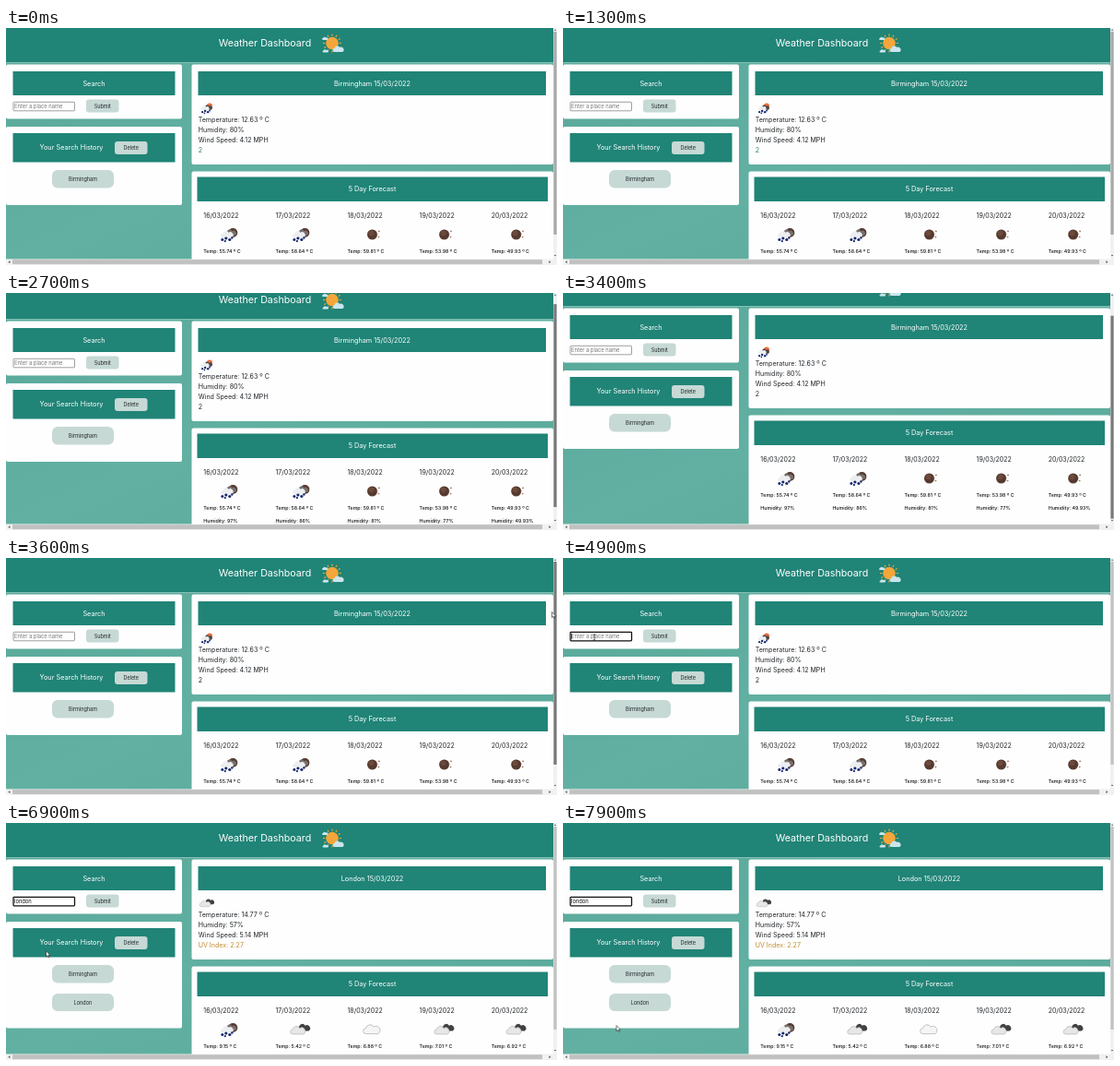
These frames come from a looping animation (598x257 px, 8 s). An HTML page:

```html
<!DOCTYPE html>
<html lang="en">
<head>
<meta charset="utf-8">
<title>Weather Dashboard</title>
<style>
html, body { margin: 0; width: 598px; height: 257px; overflow: hidden; }
svg { display: block; font-family: Inter, "Open Sans", sans-serif; font-size: 7.3px; fill: #212529; }
.mid { text-anchor: middle; }
.light { fill: #fff; }
.title { font-size: 10.7px; }
.line { font-size: 7.1px; }
.date { font-size: 7px; }
.small { font-size: 5.3px; font-weight: 500; fill: #111; }
.button { font-size: 5.5px; }
.field { font-size: 5.8px; }
</style>
</head>
<body>
<svg id="stage" width="598" height="257" viewBox="0 0 598 257">
  <defs>
    <linearGradient id="backdrop" x2="1" y2="1">
      <stop offset="0" stop-color="#58a899"/>
      <stop offset=".5" stop-color="#62b0a2"/>
      <stop offset="1" stop-color="#58a899"/>
    </linearGradient>
    <path id="puff" d="M-6 4a2.6 2.6 0 0 1 0-5.2a4 4 0 0 1 7.4-1.4a3.3 3.3 0 0 1 4.2 6.6z"/>
    <g id="drops" fill="#17296f">
      <circle cx="-6.5" cy="5.5" r="1.5"/><circle cx="-2.5" cy="4" r="1.6"/>
      <circle cx="1.5" cy="5.5" r="1.6"/><circle cx="-3.5" cy="7.2" r="1.1"/>
      <circle cx="4" cy="3.5" r="1.2"/>
    </g>
    <g id="rainDay">
      <circle cx="4" cy="-3.5" r="4" fill="#ea6e3c"/>
      <use href="#puff" transform="translate(2 -1) scale(.8)" fill="#4a4547"/>
      <use href="#puff" transform="translate(-2 0) scale(.75)" fill="#eceef0"/>
      <use href="#drops"/>
    </g>
    <g id="rainNight">
      <circle cx="5" cy="-2" r="5" fill="#56392f"/>
      <use href="#puff" transform="translate(3 -2) scale(.75)" fill="#77706e"/>
      <use href="#puff" transform="translate(-1 0) scale(.85)" fill="#eceef0"/>
      <use href="#drops"/>
    </g>
    <g id="clearNight">
      <circle r="5.5" fill="#56392f"/>
      <circle cx="-1" cy="-1.5" r="3" fill="#6c4a3b"/>
      <circle cx="7.4" cy="-3.6" r=".9" fill="#a07a66"/>
      <circle cx="7" cy="2.6" r=".9" fill="#a07a66"/>
      <circle cx="5.4" cy="-.6" r=".6" fill="#a07a66"/>
    </g>
    <g id="clouds">
      <use href="#puff" transform="translate(4 -2) scale(.9)" fill="#414042"/>
      <use href="#puff" transform="translate(-2 1)" fill="#e7e7e7" stroke="#aaa" stroke-width=".6"/>
    </g>
    <use id="cloud" href="#puff" transform="scale(1.15)" fill="#f5f5f5" stroke="#aaa" stroke-width=".6"/>
  </defs>
  <rect width="598" height="257" fill="url(#backdrop)"/>
  <g id="page"></g>
  <g id="bars"></g>
  <path id="arrow" d="M0 0v6.2l1.5-1.3l1 2.2l.9-.4l-1-2.1h2z" fill="#fff" stroke="#222" stroke-width=".6"/>
  <path id="beam" d="M-1.3-3h2.6M0-3v6M-1.3 3h2.6" stroke="#222" stroke-width=".7"/>
</svg>
<script>
const LOOP = 8000, TEAL = '#208477';
const $ = id => document.getElementById(id);

const rect = (x, y, w, h, fill, r = 0, more = '') =>
  `<rect x="${x}" y="${y}" width="${w}" height="${h}" rx="${r}" fill="${fill}" ${more}/>`;
const text = (x, y, str, cls, more = '') => `<text x="${x}" y="${y}" class="${cls}" ${more}>${str}</text>`;
const icon = (name, x, y, size = 1) => `<use href="#${name}" transform="translate(${x} ${y}) scale(${size})"/>`;
const card = (x, y, w, h, more) => rect(x, y, w, h, '#fefefe', 2, more);
const button = (x, y, w, h, r, label) =>
  rect(x, y, w, h, '#c6d9d5', r) + text(x + w / 2, y + h / 2 + 2, label, 'mid button');

function sun() {
  let rays = '';
  for (let a = 0; a < 360; a += 30)
    rays += `<path d="M0-7.8V-10" stroke="#f5a73b" stroke-width="1.1" transform="rotate(${a})"/>`;
  return `<g transform="translate(354 16.5)">${rays}<circle r="6.8" fill="#f5a63a"/>
    <g fill="#c9e6ee"><use href="#puff" transform="translate(7 6.5) scale(.75)"/>
    <use href="#puff" transform="translate(-7.5 -5) scale(.4)"/>
    <use href="#puff" transform="translate(-7 8.5) scale(.4)"/></g></g>`;
}

function report(id, { city, sky, facts, uv, uvColor, days }) {
  const lines = ['Temperature: ' + facts[0] + ' º C', 'Humidity: ' + facts[1] + '%', 'Wind Speed: ' + facts[2] + ' MPH'];
  return `<g id="${id}">` +
    text(397.5, 62.5, city + ' 15/03/2022', 'mid light') +
    icon(sky, 218, 87, .75) +
    lines.map((s, i) => text(208.7, 102 + i * 11.1, s, 'line')).join('') +
    text(208.7, 135.3, uv, 'line', `id="${id}Uv" fill="${uvColor}"`) +
    days.map(([name, temp, damp], i) => {
      const x = 214.3 + i * 78.1;
      return text(x, 205.5, 16 + i + '/03/2022', 'date') + icon(name, x + 27, 224) +
        text(x, 244, `Temp: ${temp} º C`, 'small') + text(x, 258, `Humidity: ${damp}%`, 'small');
    }).join('') + '</g>';
}

const birmingham = {
  city: 'Birmingham', sky: 'rainDay', facts: ['12.63', 80, '4.12'], uv: '2', uvColor: '#212529',
  days: [['rainNight', '55.74', 97], ['rainNight', '58.64', 86], ['clearNight', '59.81', 81],
    ['clearNight', '53.98', 77], ['clearNight', '49.93', 49.93]]
};
const london = {
  city: 'London', sky: 'clouds', facts: ['14.77', 57, '5.14'], uv: 'UV Index: 2.27', uvColor: '#c08c2e',
  days: [['rainNight', '9.15', 80], ['clouds', '5.42', 71], ['cloud', '6.88', 66],
    ['clouds', '7.01', 70], ['clouds', '6.92', 68]]
};

$('page').innerHTML =
  rect(0, 0, 594, 37, TEAL) + rect(0, 37, 594, 1, '#86c0b5') +
  text(281, 19.7, 'Weather Dashboard', 'mid light title') + sun() +
  card(0, 39.5, 191, 59) + rect(7.5, 47, 176, 26, TEAL) + text(95.5, 62.5, 'Search', 'mid light') +
  rect(8, 80.3, 66.5, 9.5, '#fff', .8, 'id="box"') + text(9, 87.2, '', 'field', 'id="typed"') +
  rect(27.6, 81.8, .6, 6.5, '#000', 0, 'id="caret"') +
  button(87, 77.5, 35.5, 14, 3, 'Submit') +
  card(0, 107, 191, 85, 'id="history"') + rect(7.5, 114, 176, 31.5, TEAL) +
  text(71, 132, 'Your Search History', 'mid light') + button(118, 123, 35.5, 14, 3, 'Delete') +
  button(50, 154, 67, 19.5, 6, 'Birmingham') +
  `<g id="saved">${button(50, 185, 67, 19, 6, 'London')}</g>` +
  card(201.5, 39.5, 392.5, 108.5) + rect(208.5, 47, 377.5, 26, TEAL) +
  card(201.5, 155.5, 392.5, 130) + rect(207.5, 161.5, 380.5, 26.5, TEAL) +
  text(397.5, 177, '5 Day Forecast', 'mid light') +
  report('before', birmingham) + report('after', london);

$('bars').innerHTML =
  rect(594, 0, 4, 257, '#f1f1f1') + rect(0, 250.5, 598, 6.5, '#f1f1f1') +
  rect(594.4, 4, 3.2, 220, '#c1c1c1', 0, 'id="thumb"') + rect(7, 251.2, 575, 5, '#c1c1c1') +
  '<path d="M594.8 2.8l1.2-1.6l1.2 1.6zM594.8 246l1.2 1.6l1.2-1.6zM4.4 252.2v3l-2-1.5zM589.4 252.2v3l2-1.5z" fill="#555"/>';

// Interpolates [time, value...] keys with a soft start and stop.
function track(keys, t) {
  if (t <= keys[0][0]) return keys[0].slice(1);
  for (let i = 1; i < keys.length; i++) {
    const [a, b] = [keys[i - 1], keys[i]];
    if (t < b[0]) {
      const k = (t - a[0]) / (b[0] - a[0]), e = k * k * (3 - 2 * k);
      return a.slice(1).map((v, j) => v + (b[j + 1] - v) * e);
    }
  }
  return keys[keys.length - 1].slice(1);
}
const scrollKeys = [[2200, 0], [2650, 9], [2750, 9], [3200, 23], [3400, 23], [3600, 0]];
const mouseKeys = [[3650, 592.5, 58.5], [4500, 34, 86], [6600, 34, 86], [7300, 58, 219.5]];

const show = (id, on) => $(id).setAttribute('visibility', on ? 'visible' : 'hidden');
const set = (id, attrs) => Object.entries(attrs).forEach(([k, v]) => $(id).setAttribute(k, v));

function draw(t) {
  const [scroll] = track(scrollKeys, t);
  set('page', { transform: `translate(0 ${-scroll})` });
  set('thumb', { y: 4 + scroll * .9, fill: t < 1900 ? '#a8a8a8' : t < 3750 ? '#787878' : '#c1c1c1' });

  const focus = t >= 4600, typing = t >= 5000;
  const count = typing ? Math.min(6, Math.floor((t - 5000) / 100) + 1) : 0;
  const word = count ? 'london'.slice(0, count) : 'Enter a place name';
  if ($('typed').textContent !== word) $('typed').textContent = word;
  set('typed', { fill: typing ? '#111' : '#777' });
  set('box', { stroke: focus ? '#111' : '#777', 'stroke-width': focus ? 1.3 : .7 });
  set('caret', { x: 9.1 + count * 3.1 });
  show('caret', focus && (t < 6000 || Math.floor((t - 6000) / 500) % 2 === 0));

  const saved = t >= 5900, loaded = t >= 6400;
  show('saved', saved);
  set('history', { height: saved ? 115.5 : 85 });
  show('before', !loaded);
  show('after', loaded);
  set('beforeUv', { fill: t < 1900 ? '#1f7d72' : '#212529' });

  const [x, y] = track(mouseKeys, t);
  const inField = x > 8 && x < 75 && y > 80 && y < 90;
  show('arrow', t >= 3550 && !inField);
  show('beam', t >= 3550 && inField);
  for (const id of ['arrow', 'beam']) set(id, { transform: `translate(${x} ${y})` });
}

const start = performance.now();
function tick() {
  draw((performance.now() - start) % LOOP);
  requestAnimationFrame(tick);
}
tick();
</script>
</body>
</html>
```
